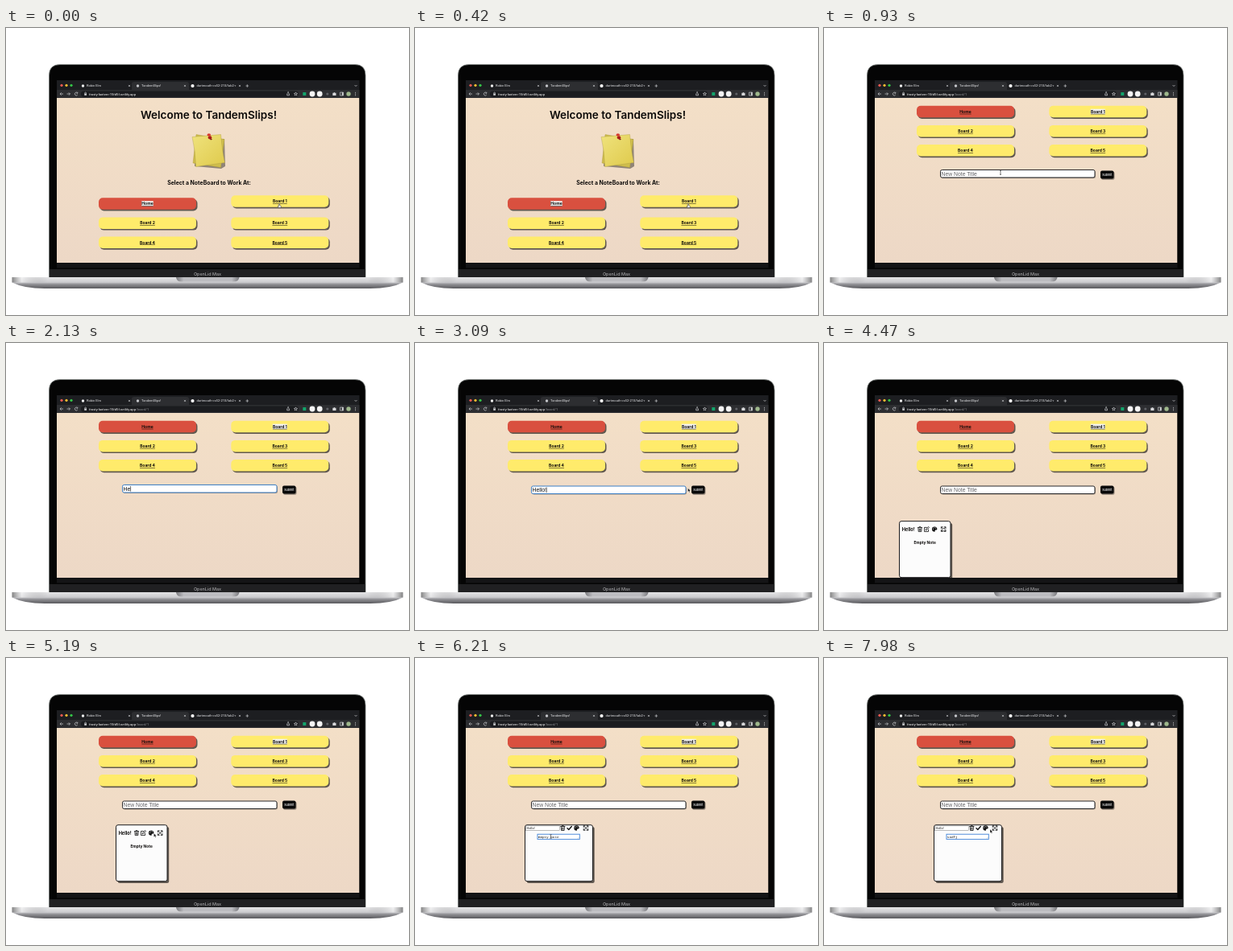
Write an HTML page that moves like this. It is 500 by 357 pixels and loops after 8 s.

```html
<!DOCTYPE html>
<html lang="en">
<head>
<meta charset="utf-8">
<title>Note board demo</title>
<style>
  html, body { margin: 0; width: 100%; height: 100%; overflow: hidden; background: #fff; }
  svg { display: block; width: 500px; height: 357px; }
  text { font-family: Inter, sans-serif; font-weight: 700; fill: #0c0a09; white-space: pre; }
  .mid { text-anchor: middle; }
  .link { font-size: 5px; text-anchor: middle; text-decoration: underline; }
  .chrome { font: 400 4.05px Roboto, sans-serif; fill: #e8e9eb; }
  .url { font-size: 4.15px; fill: #fff; }
  .field { font: 400 6.8px "Liberation Sans", Arial, sans-serif; fill: #111; }
  .mono { font: 400 4.3px "Liberation Mono", monospace; fill: #111; }
  .stroke { fill: none; stroke: #c9cacd; stroke-width: .7; }
  .ink { fill: none; stroke: #111; stroke-width: .8; stroke-linecap: round; stroke-linejoin: round; }
  .bold { stroke-width: 1.4; }
</style>
</head>
<body>
<svg viewBox="0 0 500 357">
  <defs>
    <linearGradient id="page" x2="0" y2="1">
      <stop stop-color="#f3dfc7"/><stop offset="1" stop-color="#edd8c6"/>
    </linearGradient>
    <linearGradient id="metal" x2="0" y2="1">
      <stop stop-color="#e4e4e6"/><stop offset=".45" stop-color="#cbcbce"/>
      <stop offset=".62" stop-color="#929296"/><stop offset="1" stop-color="#58585c"/>
    </linearGradient>
    <linearGradient id="ends">
      <stop stop-color="#555" stop-opacity=".65"/><stop offset=".025" stop-color="#fff" stop-opacity=".5"/>
      <stop offset=".09" stop-color="#777" stop-opacity="0"/><stop offset=".91" stop-color="#777" stop-opacity="0"/>
      <stop offset=".975" stop-color="#fff" stop-opacity=".5"/><stop offset="1" stop-color="#555" stop-opacity=".65"/>
    </linearGradient>
    <linearGradient id="notch">
      <stop stop-color="#77777b"/><stop offset=".12" stop-color="#bcbcc0"/>
      <stop offset=".88" stop-color="#bcbcc0"/><stop offset="1" stop-color="#77777b"/>
    </linearGradient>
    <linearGradient id="paper" x2="1" y2="1">
      <stop stop-color="#efe27c"/><stop offset="1" stop-color="#dfca4c"/>
    </linearGradient>
    <filter id="soft" x="-20%" y="-20%" width="150%" height="150%"><feGaussianBlur stdDeviation=".6"/></filter>
    <clipPath id="view"><path d="M63 87H438.500V292H63z"/></clipPath>
  </defs>

  <!-- laptop -->
  <path d="M53.500 310V59Q53.500 45.500 67 45.500H433Q446 45.500 446 59V310z" fill="#050505" stroke="#6f7472" stroke-width=".8"/>
  <path d="M63 292H438.500V298.500H63z" fill="#141416"/>
  <path d="M54 300H445.500V310H54z" fill="#202022"/>
  <text x="250" y="307.600" class="mid" style="font-size:5.400px;font-weight:500;fill:#a2a2a5">OpenLid Max</text>
  <path d="M7.500 310H492.500V316.500Q478 324 452 324H48Q22 324 7.500 316.500z" fill="url(#metal)"/>
  <path d="M7.500 310H492.500V316.500H7.500z" fill="url(#ends)"/>
  <path d="M211 310H289.500Q289 315.500 282 315.500H218Q211.500 315.500 211 310z" fill="url(#notch)"/>

  <!-- browser -->
  <path d="M63 65H438.500V87H63z" fill="#1d1e21"/>
  <path d="M63 77H438.500V87H63z" fill="#2d2e31"/>
  <path d="M156 77V69.500Q156 67 159 67H224Q227 67 227 69.500V77z" fill="#2d2e31"/>
  <rect x="93" y="78.500" width="270" height="7.200" rx="3.600" fill="#1b1c1f"/>
  <g id="chrome"></g>
  <text class="chrome" x="100" y="73.200">Robin Elm</text>
  <text class="chrome" x="168" y="73.200">TandemSlips!</text>
  <text class="chrome" x="236.500" y="73.200">dartmouth-cs52-21S/lab2-r</text>
  <text class="chrome url" x="103" y="83.500">frosty-lantern-15fd5f.netlify.app<tspan data-show="600 8000" fill="#8b8d91">/board/1</tspan></text>

  <!-- page -->
  <g clip-path="url(#view)">
    <path d="M63 87H438.500V292H63z" fill="url(#page)"/>
    <g data-show="0 600">
      <text x="251.500" y="112.500" class="mid" style="font-size:13.500px;font-weight:600">Welcome to TandemSlips!</text>
      <path d="M235 138L271 138L272 172L267 175L234 172z" fill="#0006" filter="url(#soft)"/>
      <path d="M236 132.500L271 138.500L266.500 173.500L232 168z" fill="#cfbd4c" stroke="#a9973a" stroke-width=".4"/>
      <path d="M231 135.500L266.500 132.500Q268 152 271.500 167.500L235.500 172.500Q235 152 231 135.500z" fill="url(#paper)" stroke="#ad9c40" stroke-width=".4"/>
      <path d="M251 135L254 139.500L256 138.500z" fill="#7a1c16"/>
      <ellipse cx="253" cy="136.300" rx="2.300" ry="2.100" fill="#a91f18"/>
      <ellipse cx="251.800" cy="132.900" rx="2.300" ry="1.700" fill="#d9382c"/>
      <text x="252" y="194.600" class="mid" style="font-size:6.900px">Select a NoteBoard to Work At:</text>
    </g>
    <g id="nav"></g>

    <g data-show="600 8000">
      <g id="field">
        <rect x="145.500" y="179" width="191.500" height="9.500" rx="2" fill="#0005" filter="url(#soft)"/>
        <rect id="fieldBox" x="144.500" y="178" width="191.500" height="9.500" rx="2" fill="#fff"/>
        <text id="title" class="field" x="145.600" y="185.100"></text>
        <path id="caret" d="M0 179.500V186.200" stroke="#111" stroke-width=".6"/>
      </g>
      <g id="submit">
        <rect x="344" y="178.700" width="16.500" height="10" rx="2" fill="#0006" filter="url(#soft)"/>
        <rect x="343" y="177.500" width="16.500" height="10" rx="2" fill="#080808"/>
        <text x="351.300" y="183.800" class="mid" style="font-size:3.700px;font-weight:500;fill:#fff">Submit</text>
      </g>
    </g>

    <g id="note" data-show="3450 8000">
      <rect id="noteShadow" x="2.200" y="2.200" height="70" rx="2.500" fill="#0009" filter="url(#soft)"/>
      <rect id="noteBox" height="70" rx="2.500" fill="#fcfcfc" stroke="#1c1c1e"/>
      <g data-show="3450 5560">
        <text x="3.200" y="12" style="font-size:5.600px">Hello!</text>
        <text x="31.600" y="28.300" class="mid" style="font-size:4.800px">Empty Note</text>
      </g>
      <g data-show="5560 8000">
        <rect x="1.200" y="1.200" width="41.500" height="5.600" fill="#fff" stroke="#777" stroke-width=".5"/>
        <text class="field" x="2" y="5.400" style="font-size:4px">Hello!</text>
        <rect x="15.500" y="11.500" width="52.300" height="6.200" fill="#fff" stroke="#3f82d8" stroke-width=".9"/>
        <path d="M65.500 17L67.300 15.200" stroke="#888" stroke-width=".4"/>
        <rect data-show="6550 6800" x="16.300" y="12.300" width="26" height="4.600" fill="#b4d5fe"/>
        <text id="body" class="mono" x="16.300" y="16"></text>
      </g>
      <g id="icons"></g>
    </g>
  </g>

  <g id="cursor">
    <path id="arrow" d="M0 0V4.600L1.100 3.700L1.900 5.300L2.700 4.900L2 3.400L3.300 3.300z" fill="#111" stroke="#fff" stroke-width=".35"/>
    <path id="hand" d="M-.7 -2.200Q0 -3 .6 -2.200V-.3L2.200 .3Q2.500 1 1.900 2.600H-1L-2 .8Q-1.600 .1 -.7 1z" fill="#fff" stroke="#222" stroke-width=".5"/>
    <path id="fist" d="M-1.500 -.9Q0 -1.800 1.500 -.9L1.600 .6L1 1.800H-1L-1.700 .5z" fill="#fff" stroke="#222" stroke-width=".6"/>
    <path id="beam" d="M-1 -2.500Q0 -2.500 0 -1.700Q0 -2.500 1 -2.500M0 -1.700V1.800M-1 2.500Q0 2.500 0 1.700Q0 2.500 1 2.500" fill="none" stroke="#222" stroke-width=".6"/>
  </g>
</svg>
<script>
const LOOP = 8000;
const $ = id => document.getElementById(id);
const put = (id, markup) => { $(id).innerHTML = markup; };
const dot = (x, y, r, fill) => `<circle cx="${x}" cy="${y}" r="${r}" fill="${fill}"/>`;
const line = (d, cls = 'stroke') => `<path class="${cls}" d="${d}"/>`;
const cross = x => line(`M${x - 1} 70.900l2 2m0 -2l-2 2`);

put('chrome', [
  dot(69, 71.300, 1.6, '#f35b52'), dot(75, 71.300, 1.6, '#f5bd30'), dot(81, 71.300, 1.6, '#34c748'),
  dot(95.500, 72, 1.7, '#eee'), dot(163.500, 72, 1.7, '#c4c6ca'), dot(231.500, 72, 2.1, '#fff'),
  cross(153), cross(222), cross(290),
  line('M297.500 72h3.600m-1.800 -1.800v3.600M432.500 71l1.500 1.500l1.500 -1.500'),
  line('M71 82h-4m1.700 -1.700l-1.700 1.700l1.700 1.700'),
  line('M75.500 82h4m-1.700 -1.700l1.700 1.700l-1.700 1.700'),
  line('M88.800 81a1.900 1.900 0 1 0 0 2m0 -3.300v1.500h-1.500'),
  line('M97.700 81.700v-.8a.9 .9 0 0 1 1.800 0v.8'),
  '<path d="M97.200 81.500h2.800v2.300h-2.800z" fill="#c9cacd"/>',
  line('M348.700 81.500v2.300h2.800v-2.300M350.100 82.500v-3m-.9 .8l.9 -.8l.9 .8'),
  line('M359.500 79.900l.6 1.400l1.500 .1l-1.100 1l.3 1.500l-1.300 -.8l-1.300 .8l.3 -1.500l-1.100 -1l1.500 -.1z'),
  '<rect x="368.300" y="80" width="4" height="4" fill="#12a46b"/>',
  dot(380, 82, 3.4, '#f5f5f5'), dot(389.200, 82, 3.4, '#f5f5f5'), dot(398.800, 82, 1.6, '#606267'),
  '<path d="M405.300 80.700h1.300a.8 .8 0 0 1 1.600 0h1.300v3.400h-4.200z" fill="#d5d6d8"/>',
  line('M414.500 80h4v4h-4z'), '<path d="M416.700 80h1.800v4h-1.800z" fill="#c9cacd"/>',
  dot(425, 82, 2.7, '#9fb88c'),
  [80.300, 82, 83.700].map(y => dot(433.500, y, .5, '#d5d6d8')).join('')
].join(''));

const labels = ['Home', 'Board 1', 'Board 2', 'Board 3', 'Board 4', 'Board 5'];
const selection = (x, y, width, span) =>
  `<rect data-show="${span}" x="${x - width / 2}" y="${y}" width="${width}" height="6.500" fill="#f1f1f0"/>`;
put('nav', labels.map((label, i) => {
  const x = i % 2 ? 279.300 : 115, y = 96.800 + 24.100 * Math.floor(i / 2), mid = x + 60.500;
  const marks = [selection(mid, y + 3.900, 14.500, '0 600'), selection(mid, y + 3.900, 18, '600 8000')];
  return `<g id="nav${i}">
    <rect x="${x + 1.5}" y="${y + 1.7}" width="121" height="14.500" rx="5" fill="#0009" filter="url(#soft)"/>
    <rect x="${x}" y="${y}" width="121" height="14.500" rx="5" fill="${i ? '#ffeb6b' : '#d9503f'}"/>
    ${marks[i] || ''}
    <text class="link" x="${mid}" y="${y + 9}">${label}</text></g>`;
}).join(''));

// Each icon sits in a 7 x 7 box.
const icons = {
  trash: line('M.8 1.500h5.400M2.500 1.300v-.7h2v.7M1.400 1.700l.3 4.800h3.600l.3 -4.800M2.800 3v2.300M4.200 3v2.300', 'ink'),
  edit: line('M3.500 1.300H.7V6.500H5.700V4M2.500 4.600L2.800 3.200L5.700 .4L6.700 1.300L3.800 4.200z', 'ink'),
  check: line('M1 3.800L2.800 5.500L6.300 1.500', 'ink bold'),
  palette: '<path d="M3.500 .3A3.200 3.200 0 1 0 3.500 6.700Q4.500 6.600 4 5.500Q3.900 4.500 5 4.500Q6.700 4.500 6.700 3.300Q6.400 .4 3.500 .3z" fill="#111"/>'
    + dot(1.8, 3.1, .5, '#fff') + dot(3, 1.7, .5, '#fff') + dot(4.8, 1.9, .5, '#fff'),
  move: line('M1 1L6 6M6 1L1 6M.7 2.500V.7H2.500M4.500 .7H6.300V2.500M.7 4.500V6.300H2.500M4.500 6.300H6.300V4.500', 'ink')
};
put('icons', Object.entries(icons).map(([name, art]) => `<g id="${name}">${art}</g>`).join(''));

const path = [
  [0, 339, 221], [600, 339, 221], [900, 219, 180], [2720, 219, 180], [2900, 272, 190],
  [3080, 338.500, 180.500], [3200, 338.500, 180.500], [3300, 350, 183], [3550, 350, 183],
  [4300, 148.500, 232], [4520, 148.500, 232], [5130, 191.500, 218], [5200, 183, 218], [5400, 170, 217],
  [5600, 170, 217], [5850, 171, 228], [6100, 168.500, 222], [7700, 168.500, 222], [7940, 206, 213]
];
const pointers = [
  [0, 'hand'], [640, 'arrow'], [850, 'beam'], [1900, ''], [2720, 'beam'], [2980, 'arrow'],
  [3250, 'hand'], [3600, 'arrow'], [4260, 'fist'], [5140, 'arrow'], [5380, 'hand'],
  [5620, 'arrow'], [5950, 'beam'], [6900, ''], [7720, 'arrow']
];
const timed = [...document.querySelectorAll('[data-show]')]
  .map(el => [el, ...el.dataset.show.split(' ').map(Number)]);

const within = (t, a, b) => t >= a && t < b;
const ease = (t, a, b) => {
  const p = Math.min(1, Math.max(0, (t - a) / (b - a)));
  return p * p * (3 - 2 * p);
};
const typed = (text, t, start, step) => text.slice(0, Math.max(0, Math.floor((t - start) / step) + 1));
const move = (id, x, y) => $(id).setAttribute('transform', `translate(${x} ${y})`);
const show = (el, on) => { el.style.display = on ? '' : 'none'; };
const write = (id, text) => { if ($(id).textContent !== text) $(id).textContent = text; };

function cursorAt(t) {
  const i = path.findLastIndex(p => p[0] <= t);
  const a = path[i], b = path[i + 1] || a;
  const p = a === b ? 0 : ease(t, a[0], b[0]);
  return [a[1] + (b[1] - a[1]) * p, a[2] + (b[2] - a[2]) * p];
}

function drawField(t) {
  const title = t < 3420 ? typed('Hello!', t, 1950, 140) : '';
  const focused = within(t, 1400, 3350);
  write('title', title || 'New Note Title');
  $('title').style.fill = title ? '#111' : '#626265';
  $('fieldBox').setAttribute('stroke', focused ? '#3d7fc4' : '#29292b');
  show($('caret'), focused);
  move('caret', 145.900 + (title ? $('title').getComputedTextLength() : 0), 0);
  move('field', 0, within(t, 860, 2930) ? -1.5 : 0);
  move('submit', 0, within(t, 3250, 3620) ? -1 : 0);
}

function drawNote(t) {
  const drag = ease(t, 4520, 5130);
  const editing = t >= 5560;
  move('note', 93.500 + 43 * drag, 221.700 - 14 * drag);
  for (const id of ['noteBox', 'noteShadow']) $(id).setAttribute('width', editing ? 84 : 63.500);
  const y = editing ? .3 : 6.400;
  const xs = editing ? [43.300, 0, 51.500, 60.500, 72] : [22, 30.300, 0, 40.200, 51.200];
  Object.keys(icons).forEach((name, i) => move(name, xs[i], y));
  show($('edit'), !editing);
  show($('check'), editing);
  write('body', t < 6800 ? 'Empty Note' : typed('sadfj', t, 7000, 130));
}

function draw(t) {
  for (const [el, from, to] of timed) show(el, within(t, from, to));
  move('nav', 0, t < 600 ? 114.500 : 0);
  move('nav1', 0, t < 600 ? -3 : 0);
  drawField(t);
  drawNote(t);
  const pointer = pointers.findLast(p => p[0] <= t)[1];
  for (const id of ['arrow', 'hand', 'fist', 'beam']) show($(id), id === pointer);
  move('cursor', ...cursorAt(t));
}

const start = performance.now();
function tick() {
  draw((performance.now() - start) % LOOP);
  requestAnimationFrame(tick);
}
tick();
</script>
</body>
</html>
```
